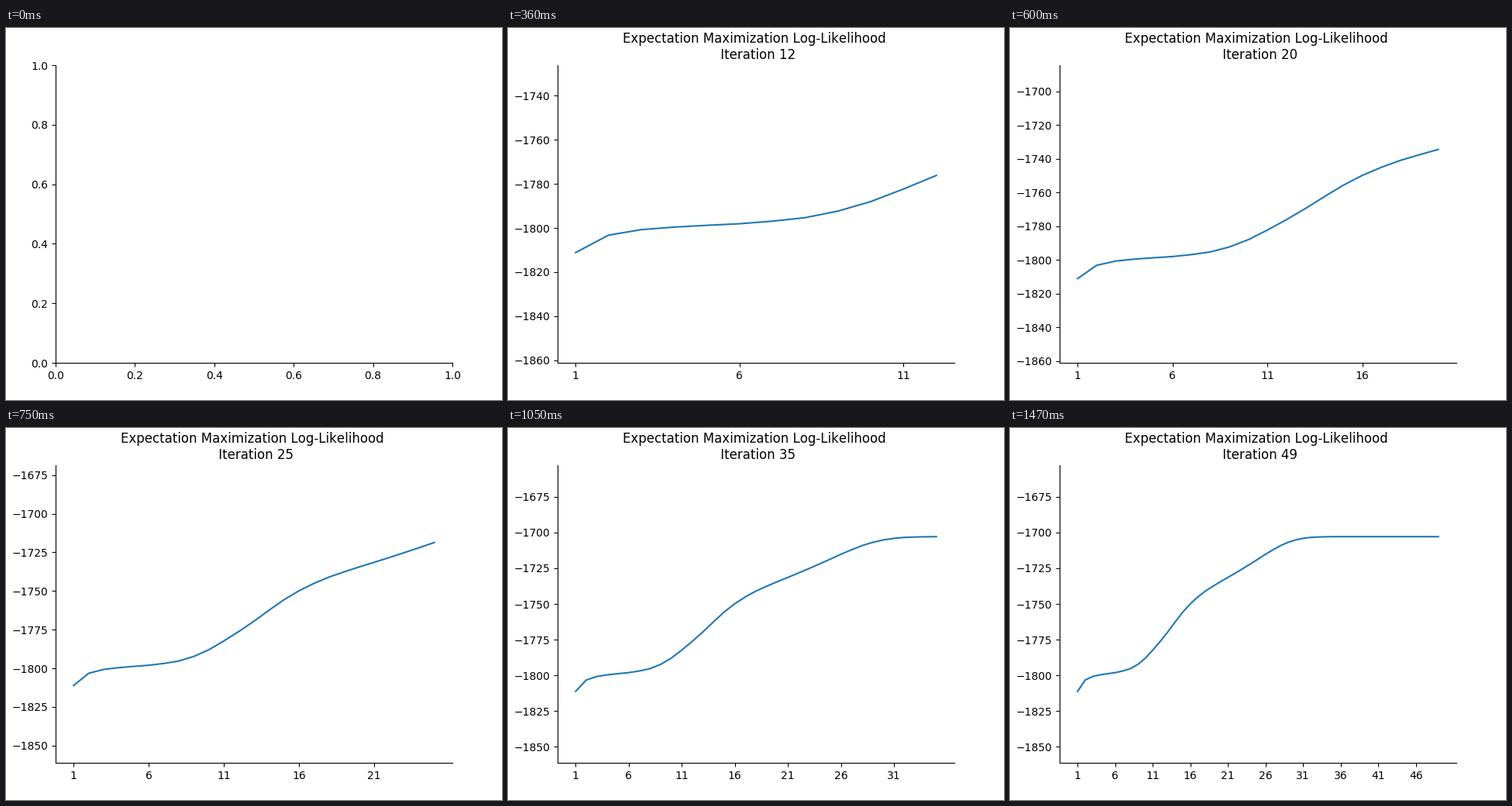
Recreate the animation shown at these times as a matplotlib script. Size 640 px wide and 480 px high, loop 1500 ms.

```python
import numpy as np
import matplotlib.pyplot as plt
from matplotlib.animation import FuncAnimation

FRAMES = 50
INTERVAL = 30
START = -1811.14
PAD = 50        # room below the first and above the last value
TICK_STEP = 5

plt.rcParams["text.kerning_factor"] = 6    # kerning in whole pixels


def log_likelihood(count):
    """Climb from START: a quick first gain, then a gain eased between keys."""
    keys = [(5, 0.7), (7, 1.6), (10, 5.7), (13.5, 7.3), (16, 4.8), (18, 3.35),
            (20, 3.0), (25, 3.4), (27, 2.9), (30, 1.1), (32, 0.25), (35, 0)]
    step = np.arange(1, count)
    gain = 7.2 * 0.25 ** (step - 1) + np.interp(step, *zip(*keys))
    return START + np.concatenate([[0], np.cumsum(gain)])


iterations = np.arange(1, FRAMES)
loglik = log_likelihood(len(iterations))

fig, ax = plt.subplots(figsize=(6.4, 4.8), dpi=100)
fig.subplots_adjust(left=0.1, right=0.9, bottom=0.1, top=0.9)
ax.spines[["top", "right"]].set_visible(False)


def update(n):
    """Draw the curve up to iteration n; n = 0 leaves empty axes."""
    ax.clear()
    if n == 0:
        return
    ax.plot(iterations[:n], loglik[:n])
    ax.set_ylim(START - PAD, loglik[n - 1] + PAD)
    ax.set_xticks(np.arange(1, n + 1, TICK_STEP))
    ax.set_title(f"Expectation Maximization Log-Likelihood \n Iteration {n}")


anim = FuncAnimation(fig, update, frames=FRAMES, interval=INTERVAL,
                     repeat=True, repeat_delay=0)
plt.show()
```
